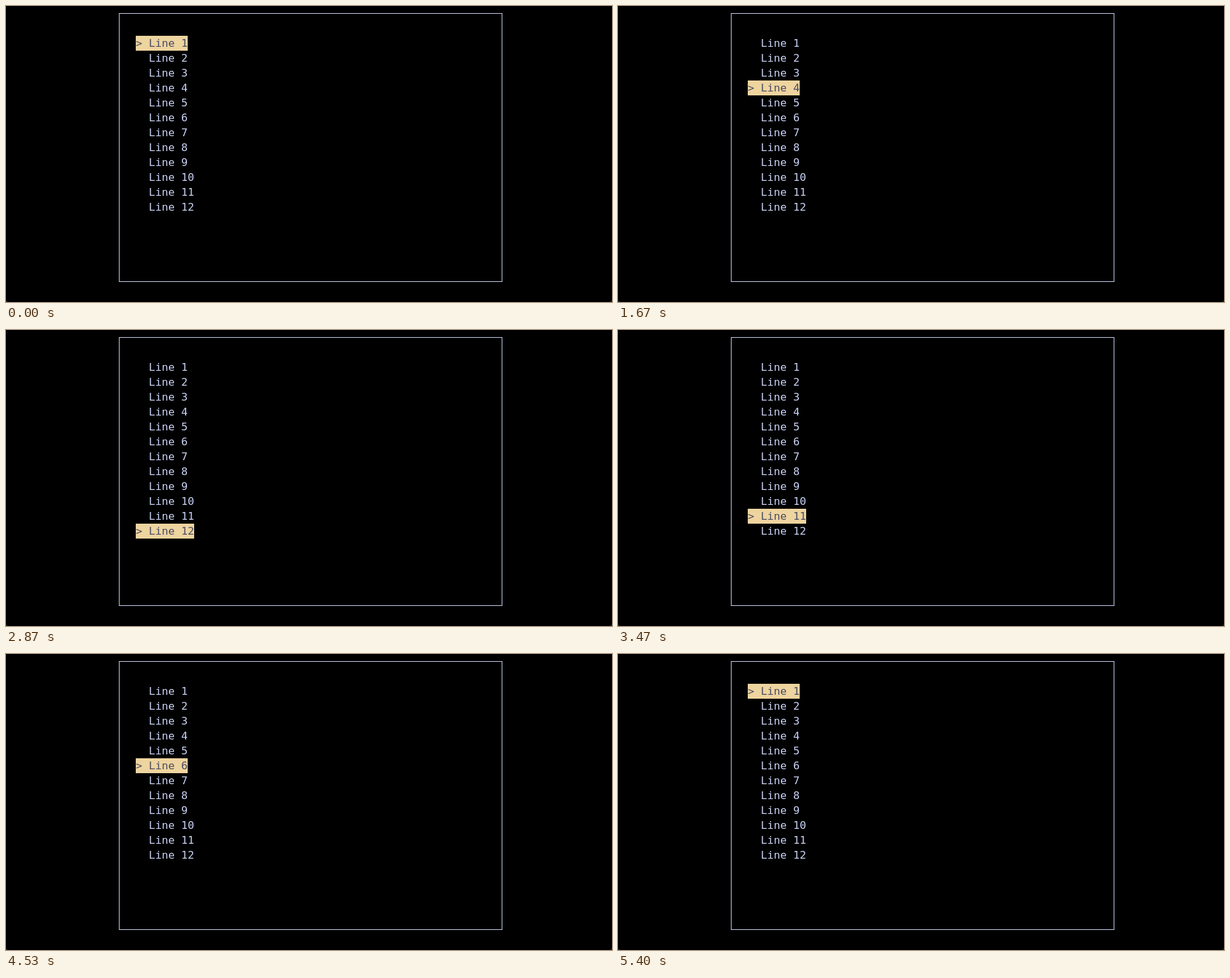
An HTML page with a canvas that plays this animation: 934x457 px, repeating every 7400 ms.

```html
<!DOCTYPE html>
<html lang="en">
<head>
<meta charset="utf-8">
<title>Line list</title>
<style>
  html, body { margin: 0; width: 100%; height: 100%; overflow: hidden; background: #1c1c1c; }
  canvas { display: block; border-radius: 0 0 5px 5px; }
</style>
</head>
<body>
<canvas id="screen" width="934" height="457"></canvas>
<script>
const ctx = document.getElementById("screen").getContext("2d");
const LOOP = 7400, LINES = 12;
const CELL_W = 10, CELL_H = 23, LEFT = 200, TOP = 46, BASELINE = 17;
const TEXT = "#cad3f5", HIGHLIGHT = "#eed49f", SELECTED_TEXT = "#494d64";

// Key press times in ms: first moving down the list, then back up.
const downs = [1270, 1530, 1670, 1800, 1930, 2130, 2270, 2400, 2530, 2670, 2870];
const ups = [3470, 3670, 3870, 4130, 4270, 4530, 4670, 4870, 5070, 5200, 5400];

const countPassed = (times, t) => times.filter(time => time <= t).length;

function drawLine(index, selected) {
  const y = TOP + index * CELL_H;
  const label = `${selected ? ">" : " "} Line ${index + 1}`;
  if (selected) {
    ctx.fillStyle = HIGHLIGHT;
    ctx.fillRect(LEFT, y, label.length * CELL_W, CELL_H);
  }
  ctx.fillStyle = selected ? SELECTED_TEXT : TEXT;
  ctx.fillText(label, LEFT, y + BASELINE);
}

function draw(t) {
  ctx.fillStyle = "#000";
  ctx.fillRect(0, 0, 934, 457);
  ctx.strokeStyle = TEXT;
  ctx.strokeRect(174.5, 11.5, 590, 414);

  const current = countPassed(downs, t) - countPassed(ups, t);
  for (let i = 0; i < LINES; i++) drawLine(i, i === current);
}

ctx.font = '16.61px "DejaVu Sans Mono", monospace';
const start = performance.now();

function tick() {
  draw((performance.now() - start) % LOOP);
  requestAnimationFrame(tick);
}
tick();
</script>
</body>
</html>
```
